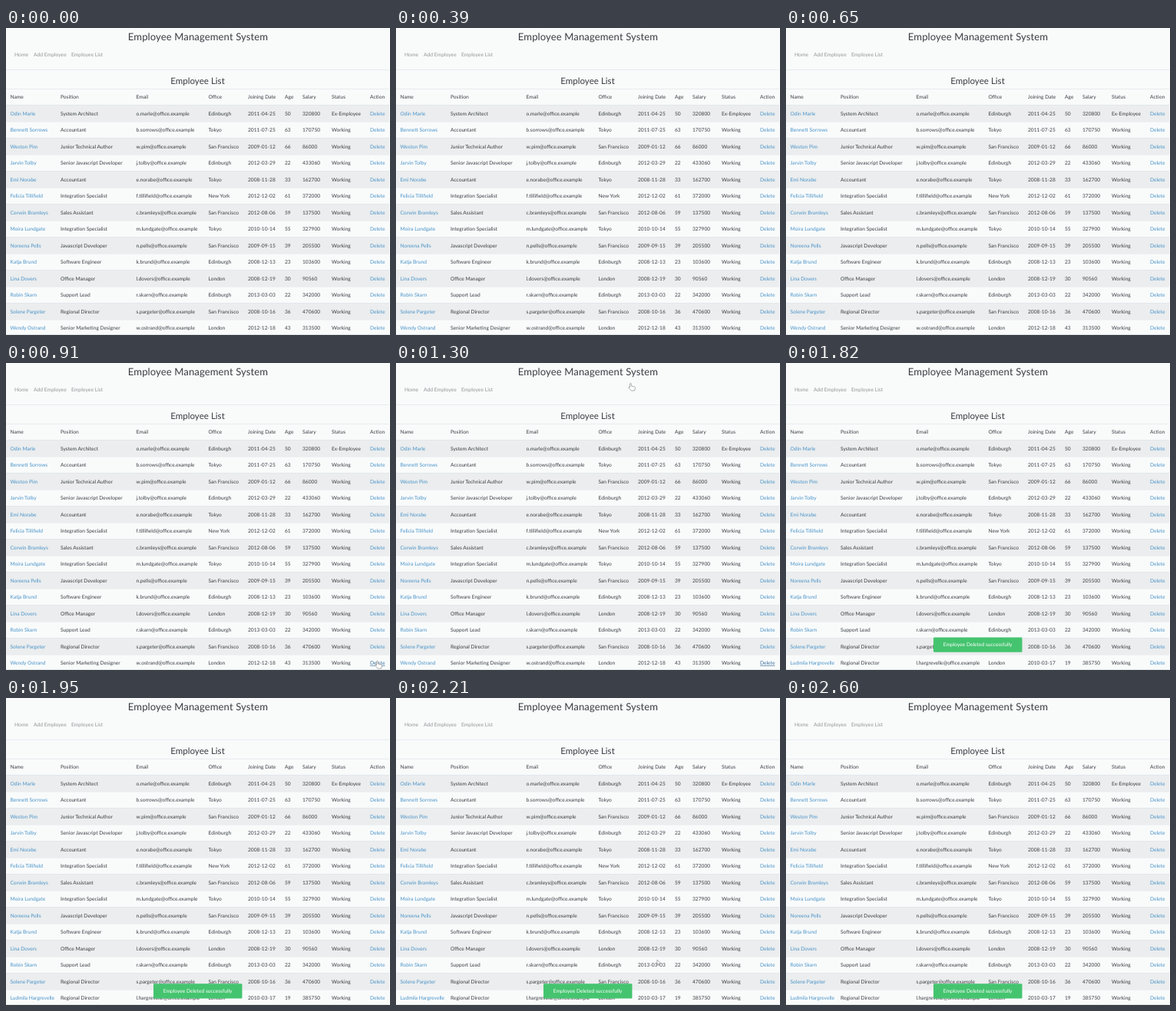
Write an HTML page that moves like this. It is 500 px wide and 400 px high and loops after 2990 ms.

```html
<!DOCTYPE html>
<html lang="en">
<head>
<meta charset="utf-8">
<style>
html, body { margin: 0; width: 100%; height: 100%; overflow: hidden; background: #f9fbfb; }
svg { display: block; width: 500px; height: 400px; }
text { font: 6.65px Lato, sans-serif; fill: #3a3e42; text-rendering: geometricPrecision; }
.title { font-size: 13.1px; text-anchor: middle; letter-spacing: .1px; }
.sub { font-size: 11.6px; text-anchor: middle; }
.nav { font-size: 6.75px; fill: #929495; }
.link { fill: #4a93c8; }
.active { fill: #3a6f9c; text-decoration: underline .5px; }
.line { fill: #dee2e6; }
.cursor path { fill: #fff; stroke: #777; stroke-width: .6; stroke-linejoin: round; }
</style>
</head>
<body>
<svg id="stage" viewBox="0 0 500 400"></svg>
<script>
const stage = document.getElementById('stage');
const COLS = [5.5, 71, 169.5, 263.5, 315, 363, 386, 424, 474];
const HEAD = 'Name|Position|Email|Office|Joining Date|Age|Salary|Status|Action';
const PEOPLE = `Odin Marle|System Architect|Edinburgh|2011-04-25|50|320800
Bennett Sorrows|Accountant|Tokyo|2011-07-25|63|170750
Weston Pim|Junior Technical Author|San Francisco|2009-01-12|66|86000
Jarvin Tolby|Senior Javascript Developer|Edinburgh|2012-03-29|22|433060
Emi Norabe|Accountant|Tokyo|2008-11-28|33|162700
Felicia Tillifield|Integration Specialist|New York|2012-12-02|61|372000
Corwin Bramleys|Sales Assistant|San Francisco|2012-08-06|59|137500
Moira Lundgate|Integration Specialist|Tokyo|2010-10-14|55|327900
Noreena Pells|Javascript Developer|San Francisco|2009-09-15|39|205500
Katja Brund|Software Engineer|Edinburgh|2008-12-13|23|103600
Lina Dovers|Office Manager|London|2008-12-19|30|90560
Robin Skarn|Support Lead|Edinburgh|2013-03-03|22|342000
Solene Pargeter|Regional Director|San Francisco|2008-10-16|36|470600
Wendy Ostrand|Senior Marketing Designer|London|2012-12-18|43|313500
Ludmila Hargrevelle|Regional Director|London|2010-03-17|19|385750`.split('\n');
const PITCH = 21.5, TOP = 100.3;

const text = (x, y, s, cls = '') => `<text x="${x}" y="${y}" class="${cls}">${s}</text>`;
const rect = (x, y, w, h, attrs) => `<rect x="${x}" y="${y}" width="${w}" height="${h}" ${attrs}/>`;
const line = y => rect(0, y, 499, .6, 'class="line"');

function row(person, i, slot) {
  const [name, job, city, date, age, pay] = person.split('|');
  const [first, last] = name.toLowerCase().split(' ');
  const cells = [name, job, `${first[0]}.${last}@office.example`, city, date, age, pay,
    i ? 'Working' : 'Ex-Employee', 'Delete'];
  const y = TOP + slot * PITCH;
  return `<g id="row${i}">` +
    (slot % 2 ? '' : rect(0, y, 499, PITCH, 'fill="#ebedee"')) + line(y) +
    cells.map((s, c) => text(COLS[c], y + 13.3, s, c % 8 ? '' : 'link')).join('') + '</g>';
}

stage.innerHTML =
  text(250, 15.7, 'Employee Management System', 'title') +
  [[11, 'Home'], [36, 'Add Employee'], [85, 'Employee List']].map(([x, s]) => text(x, 37, s, 'nav')).join('') +
  line(54) + text(249.5, 72.5, 'Employee List', 'sub') + line(79) +
  HEAD.split('|').map((s, c) => text(COLS[c], 92.2, s)).join('') +
  PEOPLE.map((p, i) => row(p, i, Math.min(i, 13))).join('') +
  rect(0, 399.3, 499, .7, 'fill="#d5d9dc"') +
  `<g id="toast">${rect(192, 0, 115.5, 19.2, 'rx="1.2" fill="#45c46f"')}
    <text x="249.7" y="11.8" text-anchor="middle" style="fill:#fff">Employee Deleted successfully</text></g>
  <g id="hand" class="cursor"><path d="M0 .8Q.9-.5 1.8.8V4L6.2 5Q7.2 5.4 7 6.5L6.2 10H1.6L-1.7 6.2Q-1.5 4.8 0 6Z"/></g>
  <g id="arrow" class="cursor"><path d="M0 0V6.6L1.6 5.2 2.6 7.6 3.6 7.1 2.6 4.9H4.7Z"/></g>`;

const get = id => document.getElementById(id);
const show = (el, on) => el.style.display = on ? '' : 'none';
const place = (el, x, y) => el.setAttribute('transform', `translate(${x} ${y})`);
const toast = get('toast'), hand = get('hand'), arrow = get('arrow');
const doomed = get('row13'), next = get('row14'), button = doomed.lastElementChild;
const STEP = 130, LOOP = 2990;

function draw(now) {
  const t = Math.floor(now % LOOP / STEP) * STEP;
  const deleted = t >= 1560;
  show(doomed, !deleted);
  show(next, deleted);
  button.setAttribute('class', t >= 910 ? 'active' : 'link');

  // The pointer presses Delete, then heads up to confirm.
  show(hand, t >= 910 && t < 1430);
  const k = Math.min(1, Math.max(0, (t - 1040) / 260));
  place(hand, 482.5 - 178 * k, 388 - 362 * k);

  show(arrow, t >= 2080 && t < 2340);
  place(arrow, 340, 341);

  // The toast drops into its resting place.
  show(toast, t >= 1820);
  place(toast, 0, t < 1950 ? 357.5 : 372.3);
  requestAnimationFrame(draw);
}
draw(0);
</script>
</body>
</html>
```
